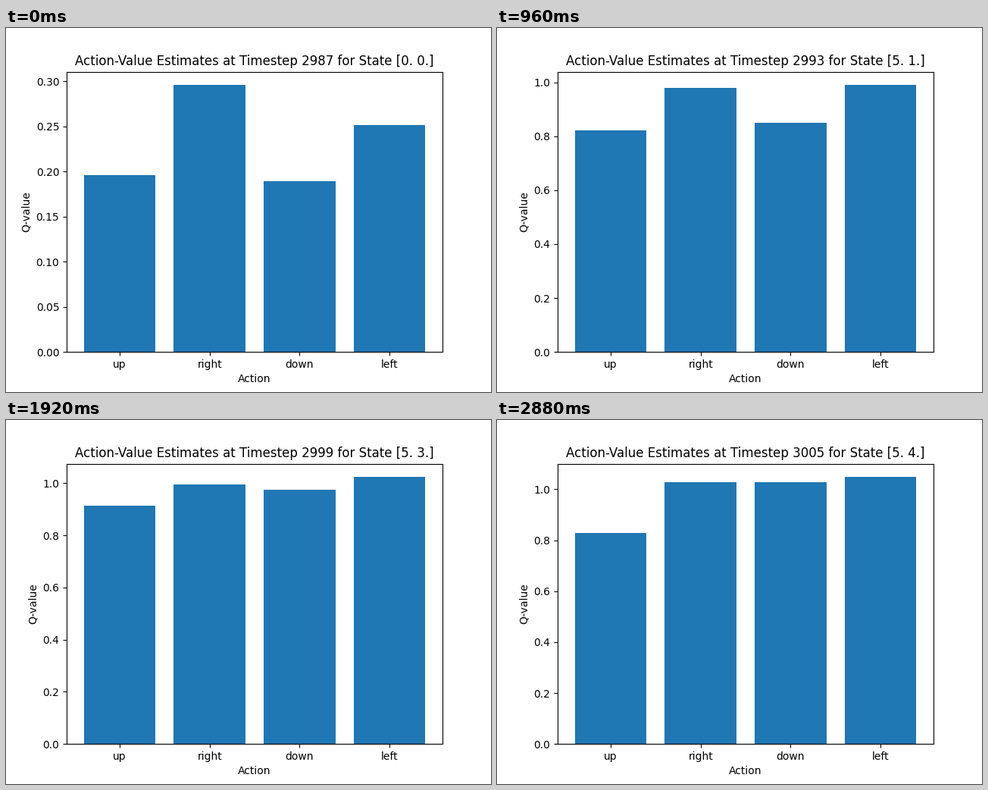
Animation of 640 by 480 pixels, one loop 3040 ms. Source, as a matplotlib script:

```python
import numpy as np
import matplotlib.pyplot as plt
from matplotlib.animation import FuncAnimation

ACTIONS = ["up", "right", "down", "left"]
FIRST_STEP, STEPS = 2987, 19
EDGE_X = 5
CLIMBS = (6, 9, 11, 13)  # steps at which the agent moves up one cell

# Key Q-values by step, in the order of ACTIONS; the rest is interpolated.
WALK = {
    0: (0.196, 0.296, 0.1894, 0.2516),
    2: (0.3165, 0.551, 0.4105, 0.531),
    4: (0.5545, 0.833, 0.6895, 0.796),
    6: (0.822, 0.9794, 0.85, 0.99),
    10: (0.9214, 0.957, 0.9076, 0.9703),
    12: (0.913, 0.995, 0.975, 1.024),
}
GOAL = {
    14: (0.8317, 1.0485, 1.0253, 1.031),
    18: (0.8287, 1.028, 1.028, 1.0485),
}

plt.rcParams["font.family"] = "DejaVu Sans"
fig, ax = plt.subplots(figsize=(6.4, 4.8), dpi=100)


def state(i):
    return min(i, EDGE_X), sum(i >= step for step in CLIMBS)


def q_values(i):
    keys = GOAL if i >= CLIMBS[-1] else WALK
    return [np.interp(i, list(keys), track) for track in zip(*keys.values())]


def draw(i):
    x, y = state(i)
    ax.clear()
    ax.bar(ACTIONS, q_values(i), color="#1f77b4")
    ax.set_xlabel("Action")
    ax.set_ylabel("Q-value")
    ax.set_title(f"Action-Value Estimates at Timestep {FIRST_STEP + i} "
                 f"for State [{x}. {y}.]")


anim = FuncAnimation(fig, draw, frames=STEPS, init_func=lambda: None,
                     interval=160, repeat=True, repeat_delay=0)
plt.show()
```
